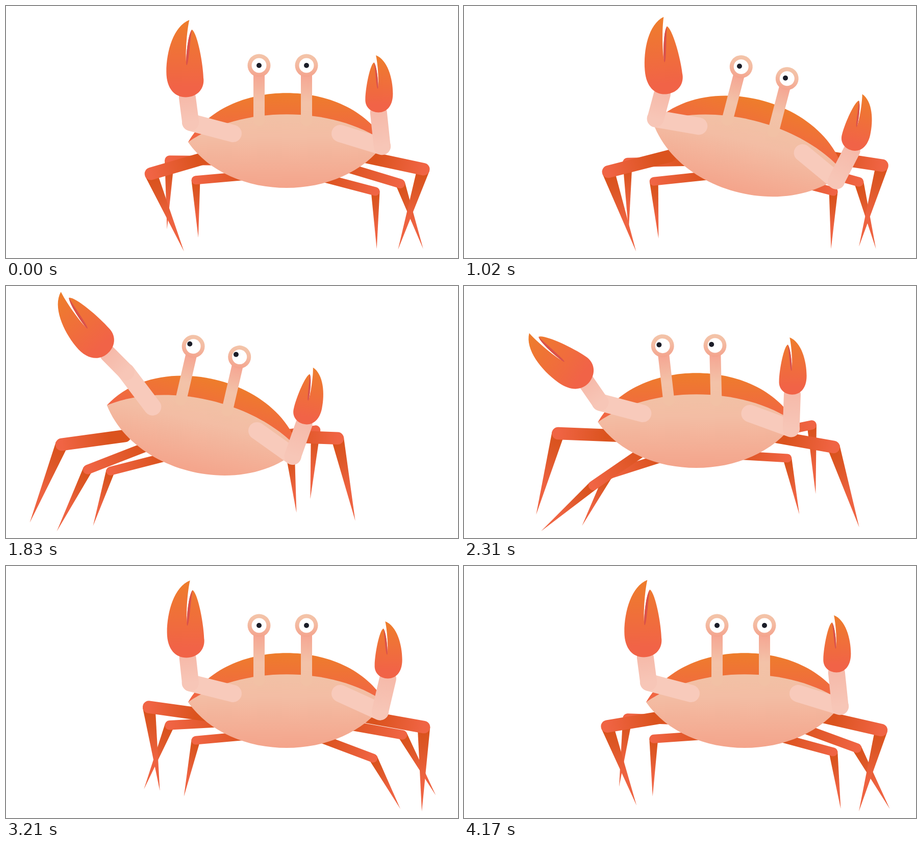
An HTML page with a canvas that plays this animation: 886 by 496 pixels, repeating every 4200 ms.

```html
<!DOCTYPE html>
<html lang="en">
<head>
<meta charset="utf-8">
<title>Crab</title>
<style>
html, body { margin: 0; width: 100%; height: 100%; overflow: hidden; background: #fff; }
canvas { display: block; }
</style>
</head>
<body>
<canvas id="stage" width="886" height="496"></canvas>
<script>
const ctx = document.getElementById('stage').getContext('2d');
const LOOP = 4200, STEP = 518, SWING = 0.6, CX = 550, CY = 264;
const { sin, cos, acos, atan2, hypot, min, PI } = Math;
const rad = d => d * PI / 180;

function ramp(t, from, to) {
  const x = min(1, Math.max(0, (t - from) / (to - from)));
  return x * x * (3 - 2 * x);
}

// Rises from a to b, stays at 1, falls from c to d
const pulse = (t, a, b, c, d) => ramp(t, a, b) - ramp(t, c, d);

function poseAt(t) {
  const lean = 14.5 * pulse(t, 540, 900, 1750, 2150);
  const look = pulse(t, 900, 1150, 2400, 2600);
  const drag = pulse(t, 1030, 1300, 1380, 1650);
  const back = pulse(t, 2165, 2310, 2310, 2550);
  const nod = pulse(t, 300, 660, 1060, 1300);
  const raise = pulse(t, 1060, 1480, 1750, 2250);
  const away = pulse(t, 1060, 1350, 2520, 2820);
  const snap = pulse(t, 2620, 2820, 2850, 3300);
  const dip = pulse(t, 3100, 3600, 3600, 4150);
  const sway = 0.9 * pulse(t, 0, 660, 1500, 2400) + pulse(t, 2000, 2820, 2900, 4100);
  return {
    lean,
    walk: -171 * pulse(t, 1030, 1475, 2167, 2477),
    eyes: [10 * drag - 6.5 * back, 10 * drag - 1.3 * back],
    gaze: [-6.8 * look, -2 * look - 3 * raise],
    left: {
      up: 14.8 - 5 * nod + 41 * raise - 6 * dip,
      fore: -7.5 + 22.5 * nod - 11 * raise - 27 * away + 16 * snap - 3 * dip,
      claw: -4.5 * nod - 54 * away + 16 * raise,
      open: pulse(t, 1150, 1350, 1350, 1600) + pulse(t, 2620, 2820, 2850, 3050)
    },
    right: {
      up: 17 + 9 * sway + lean,
      fore: -6 + 23 * sway + 0.85 * lean,
      claw: 0.9 * lean,
      open: 0
    }
  };
}

const front = { hip: [404, 295], upper: 125, lower: 166, r: 12.3 };
const mid = { hip: [475, 305], upper: 154.5, lower: 136, r: 9.3 };
const rear = { hip: [505, 331], upper: 133.5, lower: 113, r: 8.5 };

// Foot path: centre x, half stride, ground y, lift and start of the swing
const legs = [
  { ...rear, x: 360, stride: 43, ground: 472, lift: 20, start: 0.82 },
  { ...rear, x: 738, stride: 47, ground: 478, lift: 32, start: 0.25, flip: true },
  { ...mid, x: 293, stride: 69, ground: 483, lift: 50, start: 0.8 },
  { ...mid, x: 792, stride: 67, ground: 478, lift: 70, start: 0.125, flip: true },
  { ...front, x: 275, stride: 75, ground: 483, lift: 48, start: 0.005 },
  { ...front, x: 821, stride: 56, ground: 483, lift: 37, start: 0.42, flip: true }
];

// A lifted swing to the left, then a push back along the ground
function footAt(leg, t) {
  const p = (t / STEP - leg.start + 1) % 1, swinging = p < SWING;
  const u = swinging ? p / SWING : (p - SWING) / (1 - SWING);
  return [
    leg.x + leg.stride * (swinging ? 1 - 2 * u : 2 * u - 1),
    leg.ground - (swinging ? leg.lift * sin(PI * u) : 0)
  ];
}

function gradient(x0, y0, x1, y1, ...stops) {
  const g = ctx.createLinearGradient(x0, y0, x1, y1);
  stops.forEach(([at, color]) => g.addColorStop(at, color));
  return g;
}

function fill(path, style) {
  ctx.fillStyle = style;
  ctx.fill(new Path2D(path));
}

function disc(x, y, r, style) {
  ctx.fillStyle = style;
  ctx.beginPath();
  ctx.arc(x, y, r, 0, 2 * PI);
  ctx.fill();
}

function limb(x0, y0, x1, y1, width, style) {
  ctx.strokeStyle = style;
  ctx.lineWidth = width;
  ctx.lineCap = 'round';
  ctx.beginPath();
  ctx.moveTo(x0, y0);
  ctx.lineTo(x1, y1);
  ctx.stroke();
}

function group(x, y, angle, draw) {
  ctx.save();
  ctx.translate(x, y);
  ctx.rotate(angle);
  draw();
  ctx.restore();
}

function drawLeg(leg, t) {
  const { hip: [hx, hy], upper, lower, r, flip } = leg;
  let [fx, fy] = footAt(leg, t);
  if (flip) fx = 2 * CX - fx;
  const out = hx - fx, down = fy - hy;
  const d = min(hypot(out, down), upper + lower - 0.5);
  const bend = acos((upper ** 2 + d ** 2 - lower ** 2) / (2 * upper * d));
  const a = atan2(down, out) - bend;
  const kx = hx - upper * cos(a), ky = hy + upper * sin(a);
  ctx.save();
  if (flip) {
    ctx.translate(2 * CX, 0);
    ctx.scale(-1, 1);
  }
  group(kx, ky, atan2(kx - fx, fy - ky), () => fill(`M${-r} 0H${r}L0 ${lower}Z`,
    gradient(r, 10, -r, lower * 0.6, [0, '#d9521c'], [0.35, '#dd5726'], [1, '#ee6341'])));
  limb(kx, ky, hx, hy, 2 * r, gradient(kx, ky, hx, hy, [0, '#f06444'], [0.75, '#db531e'], [1, '#db531e']));
  ctx.restore();
}

function drawEye(x, tilt, gaze, lean) {
  group(x, -39, rad(tilt), () => {
    limb(0, 0, 0, -95, 22, gradient(0, -90, 0, 0, [0, '#f5a592'], [0.6, '#f3c2a8'], [1, '#f2c1a5']));
    disc(0, -108, 22.5, gradient(0, -130, 0, -86, [0, '#f3c4a9'], [0.4, '#f4bca3'], [1, '#f4a38d']));
    disc(0, -108, 14.5, '#fff');
    group(0, -108, -rad(tilt + lean), () => disc(...gaze, 5, '#1b1d28'));
  });
}

function drawBody({ eyes, gaze, lean }) {
  fill('M-193 4C-120-125 120-125 193 4Z', gradient(0, -93, 0, 4, [0, '#ee7d2b'], [1, '#f16347']));
  fill('M-193 4C-90-69 90-69 193 4C110 124-110 124-193 4Z',
    gradient(0, -51, 0, 94, [0, '#f2c1a5'], [0.3, '#f3bda4'], [1, '#f4a48b']));
  drawEye(-54, eyes[0], gaze, lean);
  drawEye(39, eyes[1], gaze, lean);
}

function drawClaw(o) {
  const main = `${7 - 11 * o} -152`, small = `${12 + 13 * o} -133`;
  const inner = `C${3 + 8 * o} -122 ${-1 + 7 * o} -62 2 -63`;
  fill(`M${main}C${-24 - 9 * o} -140 -38 -90 -38 -50C-38 -15 -20 0 0 0C20 0 36 -14 35 -35`
    + `C34 -70 ${22 + 8 * o} -128 ${small}${inner}C${-1 - 6 * o} -68 ${-8 * o} -120 ${main}Z`,
    gradient(0, -152, 0, -20, [0, '#ee7d2b'], [1, '#f16347']));
  fill(`M${small}${inner}C${6 + 3 * o} -66 ${8 + 4 * o} -110 ${small}Z`, '#d9514b');
}

function drawArm(side, sx, sy, { up, fore, claw, open }, reach, size) {
  const ex = sx + side * 86 * cos(rad(up)), ey = sy - 86 * side * -sin(rad(up)) * side;
  const wx = ex + reach * sin(rad(fore)), wy = ey - reach * cos(rad(fore));
  limb(sx, sy, ex, ey, 34, '#f8cabb');
  limb(ex, ey, wx, wy, 33, gradient(ex, ey, wx, wy, [0, '#f7c6b7'], [1, '#f6baaa']));
  const slide = side < 0 ? 0.4 * (fore - claw) : 0;
  group(wx + slide, wy, rad(claw), () => {
    ctx.scale(-side * size, size);
    drawClaw(open);
  });
}

function draw(t) {
  const p = poseAt(t), x = CX + 0.6 * p.lean, y = CY + 0.78 * p.lean;
  const c = cos(rad(p.lean)), s = sin(rad(p.lean));
  const shoulder = side => [x + side * 105 * c + 13 * s, y + side * 105 * s - 13 * c];
  const raised = { ...p.left, up: -p.left.up };
  ctx.clearRect(0, 0, 886, 496);
  ctx.save();
  ctx.translate(p.walk, 0);
  legs.forEach(leg => drawLeg(leg, t));
  group(x, y, rad(p.lean), () => drawBody(p));
  drawArm(-1, ...shoulder(-1), raised, 50, 1);
  drawArm(1, ...shoulder(1), p.right, 67, 0.74);
  ctx.restore();
}

function frame() {
  draw(performance.now() % LOOP);
  requestAnimationFrame(frame);
}
frame();
</script>
</body>
</html>
```
